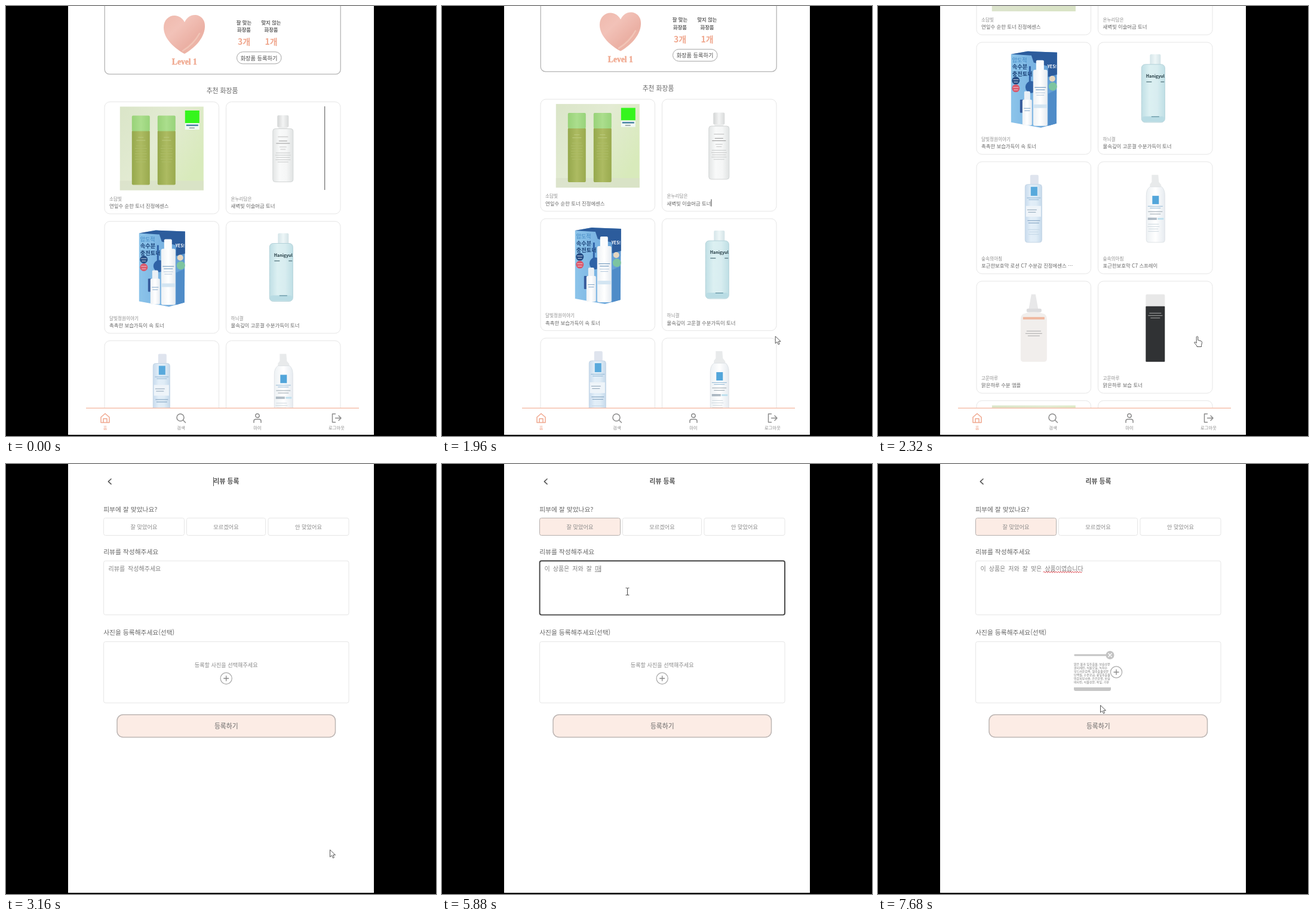
Animation of 720x720 px, one loop 8 s. Source, as an HTML page:

```html
<!DOCTYPE html>
<html lang="ko">
<head>
<meta charset="utf-8">
<title>리뷰 등록</title>
<style>
html, body { margin: 0; width: 100%; height: 100%; overflow: hidden; background: #000; }
svg { display: block; width: 100vw; height: 100vh; }
text { font-family: "Noto Sans CJK KR", "Noto Sans KR", "Noto Sans CJK", sans-serif; fill: #666; }
.mid { text-anchor: middle; }
.mono { white-space: pre; word-spacing: 2.2px; font-weight: 300; }
.line { fill: none; stroke-linecap: round; stroke-linejoin: round; }
</style>
</head>
<body>
<svg id="stage" viewBox="0 0 720 720"></svg>
<script>
const LOOP = 8000;
const PEACH = '#f0a88f';
const SCROLL = { start: 1890, length: 460, distance: 300 };
const FORM_AT = 3160, CHOOSE_AT = 3640, FOCUS_AT = 3960, TYPE_AT = 4600, BLUR_AT = 7160;
const REVIEW = '이 상품은 저와 잘 맞은 상품이였습니다';

// ---- drawing helpers ----
const rect = (x, y, w, h, fill, r = 0, extra = '') =>
  `<rect x="${x}" y="${y}" width="${w}" height="${h}" rx="${r}" fill="${fill}" ${extra}/>`;
const box = (x, y, w, h, r, stroke = '#e6e6e6', fill = '#fff', width = 1, extra = '') =>
  rect(x, y, w, h, fill, r, `stroke="${stroke}" stroke-width="${width}" ${extra}`);
const text = (x, y, size, str, extra = '') =>
  `<text x="${x}" y="${y}" font-size="${size}" ${extra}>${str}</text>`;
const centered = (x, y, size, str, extra = '') => text(x, y, size, str, 'class="mid" ' + extra);
const line = (d, stroke, width = 1, extra = '') =>
  `<path class="line" d="${d}" stroke="${stroke}" stroke-width="${width}" ${extra}/>`;
const shape = (d, fill, extra = '') => `<path d="${d}" fill="${fill}" ${extra}/>`;
const circle = (x, y, r, fill, extra = '') => `<circle cx="${x}" cy="${y}" r="${r}" fill="${fill}" ${extra}/>`;
const gradient = (id, stops, dir = 'x2="1" y2="0"') => `<linearGradient id="${id}" ${dir}>` +
  stops.map((c, i) => `<stop offset="${i / (stops.length - 1)}" stop-color="${c}"/>`).join('') + '</linearGradient>';
const group = (id, content, extra = '') => `<g id="${id}" ${extra}>${content}</g>`;
// rows of faint small print, centred on x
const print = (x, y, widths, color, step = 4) => widths.map((w, i) =>
  rect(x - w / 2, y + i * step, w, 1, color)).join('');

// ---- product pictures, drawn in a 140 x 140 square ----
const greenTube = x =>
  rect(x, 40, 30, 91, 'url(#olive)', 2) +
  rect(x, 15, 30, 26, 'url(#leaf)', 2) +
  print(x + 15, 51, [9, 15], '#bccb80', 5) +
  print(x + 15, 65, [16, 20, 18, 20, 19, 20, 16], '#aebd68', 4.5);

const greenPair = () =>
  rect(0, 0, 140, 140, 'url(#meadow)') + rect(0, 124, 140, 16, '#dbe2ca', 0, 'opacity=".7"') +
  greenTube(20) + greenTube(63) +
  rect(109, 6.5, 24, 21, '#35f51d') + rect(109, 27.5, 24, 11, '#f2f8f5') +
  rect(111, 30, 20, 2.5, '#4a83a4') + rect(116, 35, 9, 1.5, '#8a9a9a');

const clearBottle = () =>
  rect(60, 14.5, 19, 20, 'url(#silver)', 2) + rect(62, 34, 15, 4, '#eceded') +
  box(52.5, 37, 34, 89, 4, '#d2d5d5', 'url(#clear)') +
  print(69.5, 50, [17], '#bdbdbd') + print(69.5, 57, [14, 23], '#989898') +
  print(69.5, 67, [12, 9], '#c8c8c8') + print(69.5, 77, [24, 26, 23, 25, 18], '#c8caca', 3.8);

const blueBox = () =>
  shape('M32 12L60 7L109 9L108 128L82 135L32 126Z', 'url(#sky)') +
  shape('M32 12L60 7L109 9V46L94 50V32L70 26L66 14Z', '#2c5c9c') +
  circle(66, 67, 10, '#2f62a6') + rect(62, 32, 3, 30, '#2f62a6') +
  shape('M94 78L108 72V128L94 132Z', '#4f8cc8') +
  circle(101, 53, 5, '#e6d6bf') + circle(102, 66, 7, '#7cc4a0') +
  text(34, 25, 9, '압도적', 'style="fill:#3f86c2"') +
  text(34, 36.5, 9.2, '속수분', 'font-weight="700" style="fill:#1d457a"') +
  text(34, 48, 9.2, '충전토너', 'font-weight="700" style="fill:#1d457a"') +
  text(93, 35, 7, 'YES!', 'font-weight="700" style="fill:#fff"') +
  circle(40, 56, 6.5, '#254c84') + circle(40, 69, 6.5, '#d9596c') +
  print(40, 54, [9, 7], '#c7d5e5') + print(40, 67, [9, 7], '#f3c7cf') +
  rect(47, 88, 6, 22, '#365b9b', 1) +
  rect(74, 22, 13, 18, '#fbfcfd', 2) + rect(69, 38, 24, 94, 'url(#pearl)', 3) +
  print(81, 67, [19, 15], '#5f8db7') + print(81, 76, [16, 13], '#b3c8dc') + rect(70, 96, 22, 6, '#d3e5f2') +
  rect(54, 74, 10, 16, '#eaf0f5', 2) + rect(51, 88, 16, 43, 'url(#pearl)', 2) + print(59, 102, [11, 9], '#7ea4c7');

const aquaBottle = () =>
  rect(61, 12, 18, 19, 'url(#cap)', 2) +
  box(47, 29, 39, 97, 6, '#b4d2d9', 'url(#aqua)') + rect(48, 116, 37, 9, '#b9dce4', 4) +
  centered(70, 51, 7, 'Hanigyul', 'font-weight="700" style="fill:#223a42"') +
  rect(55, 57.5, 9, 1.5, '#66858d') + rect(79, 57.5, 6, 1.5, '#66858d') +
  print(70, 116, [13], '#4d8091');

const waterBottle = () =>
  rect(64, 14, 14, 17, '#dfe4ee', 2) +
  box(55.5, 30, 28, 97, 4, '#c4d5e5', 'url(#water)') +
  rect(65, 34, 11, 15, '#58a9dc') + print(70, 52, [23, 17], '#8db4d4', 3) +
  rect(57, 66, 25, 18, '#eef4f9') + print(67, 72, [16, 13], '#8ba2b5') +
  print(70, 90, [21, 18], '#7b9dbd') + print(70, 105, [20, 15, 18], '#c3d6e6');

const spray = () =>
  shape('M64 14h11l1 12l4 5v5h-19v-6l3-4z', '#e8eaeb') +
  shape('M61 34h20q5 5 5 14v75q0 4-4 4h-23q-4 0-4-4v-75q0-10 6-14z', 'url(#pearl)', 'stroke="#dadfe3" stroke-width=".8"') +
  rect(65, 49, 11, 14, '#52a5da') + print(70, 66, [25, 18], '#8fb6d3', 3) +
  print(70, 75, [24, 18], '#9aa6ae') + print(65, 86, [15, 15], '#6d8294', 2) + rect(74, 86, 10, 3, '#bfe0ee') +
  print(67, 96, [18, 20, 16, 18], '#cdd7de');

const dropper = () =>
  shape('M66 14h7l5 28h-17z', '#e8e8e9') + rect(58, 38, 25, 6, '#dcdcde', 2) +
  shape('M52 47q18-7 36 0q4 3 4 9v66q0 5-5 5h-34q-5 0-5-5v-66q0-6 4-9z', '#f1eeec') +
  rect(52, 52, 36, 4, '#efb79f') + print(70, 75, [24, 28, 20], '#aaa');

const darkJar = () =>
  rect(54, 14, 32, 22, '#e8e8e8', 2) + rect(54, 34, 32, 93, '#303234', 1) +
  print(70, 45, [20, 24, 16], '#aaa');

// ---- home page ----
const products = [
  ['소담빛', '연잎수 순한 토너 진정에센스', greenPair],
  ['온누리담은', '새벽빛 이슬머금 토너', clearBottle],
  ['달빛정원이야기', '촉촉한 보습가득이 속 토너', blueBox],
  ['하늬결', '물속깊이 고운결 수분가득이 토너', aquaBottle],
  ['숲속의아침', '포근한보호막 로션 C7 수분감 진정에센스 ⋯', waterBottle],
  ['숲속의아침', '포근한보호막 C7 스프레이', spray],
  ['고운마루', '맑은하루 수분 앰플', dropper],
  ['고운마루', '맑은하루 보습 토너', darkJar],
  ['소담빛', '연잎수 크림', greenPair],
  ['온누리담은', '새벽빛 크림', clearBottle]
];

const card = ([brand, name, picture], i) => {
  const x = 165 + (i % 2) * 203.5, y = 160.5 + (i >> 1) * 200;
  return box(x, y, 191.5, 187.5, 9) +
    `<g transform="translate(${x + 25.8} ${y + 8})">${picture()}</g>` +
    text(x + 8, y + 165.3, 7.6, brand, 'style="fill:#8d8d8d"') +
    text(x + 8, y + 177.5, 8.4, name);
};

const count = (x, first, value) =>
  centered(x, 30.8, 8.4, first, 'font-weight="700"') + centered(x, 43.3, 8.4, '화장품', 'font-weight="700"') +
  centered(x, 65.2, 14, value, `font-weight="700" style="fill:${PEACH}"`);

const summary = box(165.2, -60, 395, 174.2, 8, '#b4b4b4', '#fff', 1.3) +
  shape('M299 80C284 72 264 56 264 36C264 23 273 16 282 16C290 16 296 21 299 27C303 19 309 15 316 15C326 15 334 23 333 35C332 56 313 72 299 80Z', 'url(#heart)') +
  line('M296 75C306 69 317 59 324 46', '#f5d3c4', 2.5, 'opacity=".6"') +
  centered(298.8, 98, 13.6, 'Level 1', `font-weight="700" stroke="${PEACH}" stroke-width=".4" style="fill:${PEACH};font-family:'Liberation Serif',serif"`) +
  count(398.5, '잘 맞는', '3개') + count(444, '맞지 않는', '1개') +
  box(386.5, 76.8, 74.5, 20, 10, '#a5a5a5') +
  centered(423.5, 90.5, 9.2, '화장품 등록하기', 'font-weight="500" style="fill:#4a4a4a"') +
  centered(362, 146, 10.8, '추천 화장품');

const tab = (x, label, icon, color = '#8b8b8b') =>
  line(icon, color, 1.5, `transform="translate(${x} 690)"`) +
  centered(x, 708.5, 7.3, label, `style="fill:${color}"`);

const nav = rect(104, 673, 512, 45, '#fff') + rect(134, 672.7, 457, 1.3, '#f3b8a2') +
  tab(166, '홈', 'M-7 -1.5L0 -7.5L7 -1.5V7.5H-7ZM-3 7V1H3V7', PEACH) +
  tab(293, '검색', 'M5 -1A6 6 0 1 1 -7 -1A6 6 0 1 1 5 -1M3.5 3.5L7.5 7.5') +
  tab(421, '마이', 'M3.2 -4A3.2 3.2 0 1 1 -3.2 -4A3.2 3.2 0 1 1 3.2 -4M-6 7.5V5Q-6 2 -3 2H3Q6 2 6 5V7.5') +
  tab(553.5, '로그아웃', 'M-2 -7H-7V7H-2M-2 0H7M3.5 -4L7.5 0L3.5 4');

const home = group('page', summary + products.map(card).join('') +
  rect(533, 168, 1.3, 140, '#777', 0, 'id="pictureCaret"') +
  rect(450.5, 328, 1, 12, '#444', 0, 'id="nameCaret"')) + nav;

// ---- review form ----
const plus = (x, y) => circle(x, y, 9.6, '#fff', 'stroke="#aaa" stroke-width="1.2"') +
  line(`M${x - 4} ${y}h8M${x} ${y - 4}v8`, '#888', 1.3);
const choice = (x, w, label, id = '') => box(x, 90.5, w, 29, 3, '#e6e6e6', '#fff', 1, id && `id="${id}"`) +
  centered(x + w / 2, 109, 9.2, label, 'style="fill:#8a8a8a"');
const heading = (y, str) => text(163.2, y, 10.75, str, 'font-weight="500"');

const tinyRows = ['맑은 물과 잎추출물, 보습성분', '글리세린, 식물오일, 녹차수', '부드러운감촉, 쌀추출물성분', '단백질, 수분공급, 꽃잎추출물', '민감피부사용, 은은한향, 보습', '비타민, 식물성분, 쑥잎, 가루'];
const photo = rect(328.5, 318.5, 58, 3, '#c4c4c4', 1) +
  `<g clip-path="url(#thumb)">${tinyRows.map((row, i) => text(328, 336.7 + i * 6.1, 5, row, 'style="fill:#777"')).join('')}</g>` +
  shape('M328 374H390V377Q390 380 387 380H331Q328 380 328 377Z', '#c6c6c6') +
  circle(388.5, 320, 7, '#c3c3c3') + line('M385.8 317.3l5.4 5.4m0-5.4l-5.4 5.4', '#fff', 1.3) +
  plus(399, 348.5);

const squiggle = 'M277 181' + 'q1-2.4 2 0t2 0'.repeat(16);

const form = line('M176 25L171.3 29.3L176 33.6', '#555', 1.6) +
  centered(369, 33.3, 10.8, '리뷰 등록', 'font-weight="700" style="fill:#555"') +
  rect(347, 22, 1, 15, '#555', 0, 'id="titleCaret"') +
  heading(79.5, '피부에 잘 맞았나요?') +
  choice(163.5, 135, '잘 맞았어요', 'chosen') + choice(302.5, 132, '모르겠어요') + choice(439, 135, '안 맞았어요') +
  heading(151, '리뷰를 작성해주세요') +
  box(163.6, 162.2, 410.4, 90.4, 3, '#e6e6e6', '#fff', 1, 'id="area"') +
  '<text class="mono" x="171.5" y="178.6" font-size="10" style="fill:#808080"><tspan id="typed"></tspan><tspan id="composing" text-decoration="underline"></tspan></text>' +
  rect(0, 170, 1, 11, '#777', 0, 'id="entryCaret"') +
  line(squiggle, '#e0525a', 1, 'id="squiggle"') +
  heading(286.3, '사진을 등록해주세요(선택)') + box(163.6, 297.5, 410.4, 102.5, 3) +
  group('prompt', centered(368.7, 340, 9.15, '등록할 사진을 선택해주세요', 'style="fill:#8a8a8a"') + plus(368.7, 359)) +
  group('photo', photo) +
  box(186, 419.7, 365.5, 37.8, 10, '#bdb6b4', '#fcece5', 1.5) +
  centered(368.8, 442.6, 10.8, '등록하기');

// ---- pointers, hot spot at the origin ----
const outlined = 'stroke="#555" stroke-width="1" stroke-linejoin="round"';
const pointers = group('arrow', shape('M0 0V12L3 9.4L5 13.8L7 12.9L5.1 8.7H9Z', '#fff', outlined)) +
  group('hand', shape('M-1.3 1Q0-.8 1.3 1V6.5L6.5 8Q8.2 8.6 8 10.5L7 15.5V17.5H-.5V16L-4.8 11Q-4.8 9-2.8 10L-1.3 11.5Z', '#fff', outlined)) +
  group('beam', line('M-2.5-6Q0-6 0-5Q0-6 2.5-6M0-5V5M-2.5 6Q0 6 0 5Q0 6 2.5 6', '#555', 1.1));

document.getElementById('stage').innerHTML = '<defs>' +
  gradient('olive', ['#95a84c', '#adbb62', '#99aa4e']) + gradient('leaf', ['#98d278', '#abde8d', '#98d37a']) +
  gradient('meadow', ['#dae5c8', '#e3ebd3', '#d8eabb'], 'x2="1" y2=".6"') +
  gradient('silver', ['#d3d5d5', '#f3f4f4', '#d8dada']) + gradient('clear', ['#e3e5e5', '#f8f9f9', '#f5f6f6', '#e0e3e3']) +
  gradient('sky', ['#8cc4ea', '#79b3e2', '#5c97d0']) + gradient('pearl', ['#edf1f4', '#fff', '#e6ebf0']) +
  gradient('cap', ['#d5e5e9', '#edf6f7', '#d3e3e7']) + gradient('aqua', ['#c0dfe5', '#dcf0f2', '#d8edf0', '#bfdfe5']) +
  gradient('water', ['#c8dbed', '#e2eef8', '#dfecf6', '#c5d9eb']) +
  gradient('heart', ['#efb9ad', '#f2c2b8', '#ebb0a4', '#f1c0af'], 'x2="1" y2="1"') +
  '<clipPath id="thumb"><rect x="328" y="330" width="61.5" height="42"/></clipPath>' +
  '<clipPath id="screen"><rect x="104" width="512" height="718"/></clipPath></defs>' +
  rect(0, 0, 720, 720, '#000') +
  `<g clip-path="url(#screen)">${rect(104, 0, 512, 718, '#fff')}${group('home', home)}${group('form', form)}${group('pointer', pointers)}</g>`;

const el = Object.fromEntries([...document.querySelectorAll('#stage [id]')].map(n => [n.id, n]));
const show = (node, on) => node.style.display = on ? '' : 'none';
const within = (t, a, b) => t >= a && t < b;

// ---- typing: every key press as the text it leaves behind ----
const LEADS = 'ㄱㄲㄴㄷㄸㄹㅁㅂㅃㅅㅆㅇㅈㅉㅊㅋㅌㅍㅎ';
function strokes(ch) {
  if (ch === ' ') return [ch];
  const code = ch.charCodeAt(0), n = code - 0xAC00, tail = n % 28, open = code - tail;
  const keys = [LEADS[Math.floor(n / 588)]];
  if (Math.floor(n / 28) % 21 === 9) keys.push(String.fromCharCode(open - 28));
  keys.push(String.fromCharCode(open));
  if (tail) keys.push(ch);
  return keys;
}
const states = [''];
[...REVIEW].forEach((ch, i) => strokes(ch).forEach(key => states.push(REVIEW.slice(0, i) + key)));

// time, x, y, pointer shape, jumps here without travelling
const path = [
  [1160, 618, 628, 'arrow'], [1440, 584, 584, 'arrow'], [1680, 563, 558, 'arrow'], [1720, 558.5, 553, 'arrow'],
  [1960, 558.5, 553, 'arrow'], [2040, 534.5, 553, 'hand'], [2920, 534.5, 553, 'hand'], [3000, 542.5, 646, 'arrow'],
  [3200, 542.5, 646, 'arrow'], [3480, 234, 108, 'hand'], [3720, 234, 108, 'hand'], [3920, 302, 206, 'beam'],
  [4280, 302, 206, 'beam'], [4320, 310.5, 213.5, 'beam'], [BLUR_AT, 366, 366, 'arrow', true],
  [7500, 366, 366, 'arrow'], [7660, 372.5, 404, 'arrow']
];

function movePointer(t) {
  const i = path.findLastIndex(p => p[0] <= t);
  show(el.pointer, i >= 0);
  if (i < 0) return;
  const a = path[i], b = path[i + 1];
  const u = b && !b[4] ? (t - a[0]) / (b[0] - a[0]) : 0;
  const mix = k => u ? a[k] + (b[k] - a[k]) * u : a[k];
  el.pointer.setAttribute('transform', `translate(${mix(1)} ${mix(2)})`);
  for (const name of ['arrow', 'hand', 'beam']) show(el[name], a[3] === name);
}

function drawHome(t) {
  const u = Math.min(1, Math.max(0, (t - SCROLL.start) / SCROLL.length));
  const eased = u < .5 ? 4 * u ** 3 : 1 - (2 - 2 * u) ** 3 / 2;
  el.page.setAttribute('transform', `translate(0 ${-SCROLL.distance * eased})`);
  show(el.pictureCaret, t < 360 || within(t, 880, 1360));
  show(el.nameCaret, within(t, 1680, 2080));
}

function drawForm(t) {
  const chosen = t >= CHOOSE_AT, focused = within(t, FOCUS_AT, BLUR_AT), done = t >= BLUR_AT;
  el.chosen.setAttribute('fill', chosen ? '#fcece5' : '#fff');
  el.chosen.setAttribute('stroke', chosen ? '#b5afad' : '#e6e6e6');
  el.area.setAttribute('stroke', focused ? '#444' : '#e6e6e6');
  el.area.setAttribute('stroke-width', focused ? 1.9 : 1);
  show(el.titleCaret, t < CHOOSE_AT);
  show(el.squiggle, done);
  show(el.photo, done);
  show(el.prompt, !done);

  const key = t < TYPE_AT ? 0 : Math.min(states.length - 1, Math.max(1, Math.floor((t - 4605) / 50)));
  const value = states[key];
  const open = focused && key > 0 && !value.endsWith(' ');
  el.typed.textContent = key ? (open ? value.slice(0, -1) : value) : '리뷰를 작성해주세요';
  el.composing.textContent = open ? value.slice(-1) : '';
  show(el.entryCaret, focused && (key > 0 || t < 4480));
  if (focused) {
    const width = key ? el.typed.parentNode.getComputedTextLength() : 0;
    el.entryCaret.setAttribute('x', 171.5 + width);
  }
}

function draw(now) {
  const t = now % LOOP, onForm = t >= FORM_AT;
  show(el.home, !onForm);
  show(el.form, onForm);
  (onForm ? drawForm : drawHome)(t);
  movePointer(t);
}

const began = performance.now();
function frame() {
  draw(performance.now() - began);
  requestAnimationFrame(frame);
}
frame();
</script>
</body>
</html>
```
